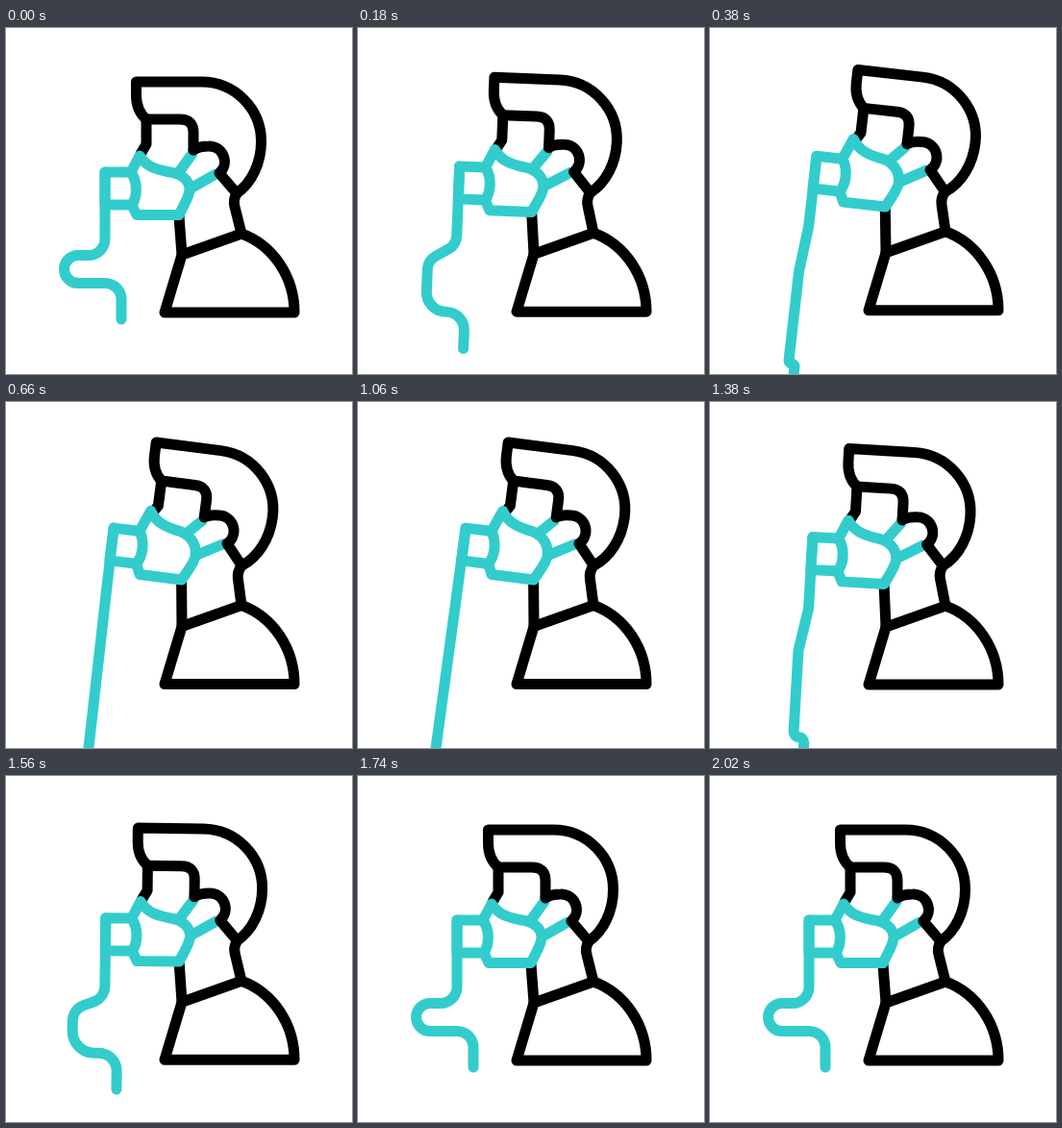
Write an HTML page with a canvas that moves like this. It is 360 by 360 pixels and loops after 2420 ms.

```html
<!DOCTYPE html>
<html lang="en">
<head>
<meta charset="utf-8">
<title>Patient with breathing mask</title>
<style>
html, body { margin: 0; width: 100%; height: 100%; overflow: hidden; background: #fff; }
canvas { display: block; width: 360px; height: 360px; }
</style>
</head>
<body>
<canvas id="stage" width="360" height="360"></canvas>
<script>
const ctx = document.getElementById('stage').getContext('2d');
const LOOP = 2420, STEP = 20, END = 2020;
const BLACK = '#000', TEAL = '#33cccc';
const PIVOT = { x: 236, y: 213 };
const TILT = 7.3 * Math.PI / 180;
const LIFT = 2.5, PUFF = 5.5;
const TUBE_X = 103, TUBE_Y = 150;

const body = new Path2D('M183 236 L245 214 C278 226 300 259 300 296 L165 296 Z');
const hair = new Path2D(
  'M146 95 C139 89 135.5 82 135.5 70 L135.5 56 L203.5 56 A62 62 0 0 1 265.5 118 ' +
  'C265.5 140 256 161 240 172 L222 151 A16 16 0 0 0 211 123 C205 123 199 124 195 127');
const face = new Path2D('M195 126 L195 109 Q195 95 181 95 L146 95 L146 121 L140 131');
const port = new Path2D('M130 150 L103 150 L103 184 L131 184');

// Corners of the curled tube, and how far each drops as it hangs straight
const corners = [
  { x: 103, y: 236.5, drop: -15 },
  { x: 60.5, y: 236.5, drop: 40 },
  { x: 60.5, y: 265.5, drop: 115 },
  { x: 120, y: 265.5, drop: 115 },
  { x: 120, y: 303, drop: 115 }
];

function ease(t, from, to) {
  const p = Math.min(1, Math.max(0, (t - from) / (to - from)));
  return p * p * (3 - 2 * p);
}

// Rises at the start, then returns between two times
const pulse = (t, from, to) => ease(t, 0, 480) - ease(t, from, to);

// One full sway while the tube hangs
function swing(t) {
  return t > 480 && t < 1120 ? 3 * Math.cos(Math.PI * (t - 640) / 320) : 0;
}

function stroke(path, color, cap = 'round') {
  ctx.strokeStyle = color;
  ctx.lineCap = cap;
  ctx.stroke(path);
}

const gap = (a, b) => Math.hypot(a.x - b.x, a.y - b.y);

function tubePath(hang, sway) {
  const pts = corners.map(c => {
    const y = c.y + c.drop * hang;
    const x = c.x + (TUBE_X - c.x) * hang + sway * (y - 165) / 200;
    return { x, y };
  });
  pts.unshift({ x: TUBE_X, y: TUBE_Y });
  const last = pts.length - 1;
  const path = new Path2D();
  path.moveTo(TUBE_X, TUBE_Y);
  for (let i = 1; i < last; i++) {
    const a = pts[i - 1], b = pts[i], c = pts[i + 1];
    const r = Math.min(17 + 30 * hang, gap(a, b) / 2, gap(b, c) / 2);
    path.arcTo(b.x, b.y, c.x, c.y, r);
  }
  path.lineTo(pts[last].x, pts[last].y);
  return path;
}

// The upper rim of the mask rises with u
const maskPath = u => new Path2D(
  `M139 ${133 - u} C146 ${144 - u} 155 ${147 - u} 168 ${149.5 - u} ` +
  `C182 ${151 - u} 191 ${158 - u / 2} 191 168 C191 175 186 182 180 194.5 ` +
  'L136 194.5 L131 184 C137 175 137 160 130 150 Z');

const strapPath = u => new Path2D(`M180 ${150 - u} L195 129 M192 167 L220 151`);

function turned(x, y, angle) {
  const c = Math.cos(angle), s = Math.sin(angle);
  const dx = x - PIVOT.x, dy = y - PIVOT.y;
  return [PIVOT.x + dx * c - dy * s, PIVOT.y + dx * s + dy * c];
}

// Upper ends follow the head, lower ends stay on the shoulders
function neckPath(angle) {
  const at = (x, y) => turned(x, y, angle);
  const path = new Path2D();
  path.moveTo(...at(180, 196));
  path.lineTo(183, 236);
  path.moveTo(...at(240, 172));
  path.quadraticCurveTo(...at(236, 179), ...at(238, 186));
  path.lineTo(245, 214);
  return path;
}

function draw(t) {
  const nod = pulse(t, 1040, 1680);
  const lift = LIFT * pulse(t, 1200, 1760);
  const hang = pulse(t, 1260, 1690);
  const angle = TILT * nod, puff = PUFF * nod;

  ctx.fillStyle = '#fff';
  ctx.fillRect(0, 0, 360, 360);
  ctx.lineWidth = 11;
  ctx.lineJoin = 'round';

  ctx.save();
  ctx.translate(0, -lift);
  stroke(body, BLACK);
  stroke(neckPath(angle), BLACK);

  ctx.translate(PIVOT.x, PIVOT.y);
  ctx.rotate(angle);
  ctx.translate(-PIVOT.x, -PIVOT.y);
  stroke(strapPath(puff), TEAL, 'butt');
  stroke(face, BLACK);
  stroke(hair, BLACK);
  stroke(tubePath(hang, swing(t)), TEAL);
  stroke(port, TEAL);
  stroke(maskPath(puff), TEAL);
  ctx.restore();
}

const start = performance.now();

function tick() {
  const t = (performance.now() - start) % LOOP;
  draw(Math.min(END, Math.floor(t / STEP) * STEP));
  requestAnimationFrame(tick);
}

tick();
</script>
</body>
</html>
```
